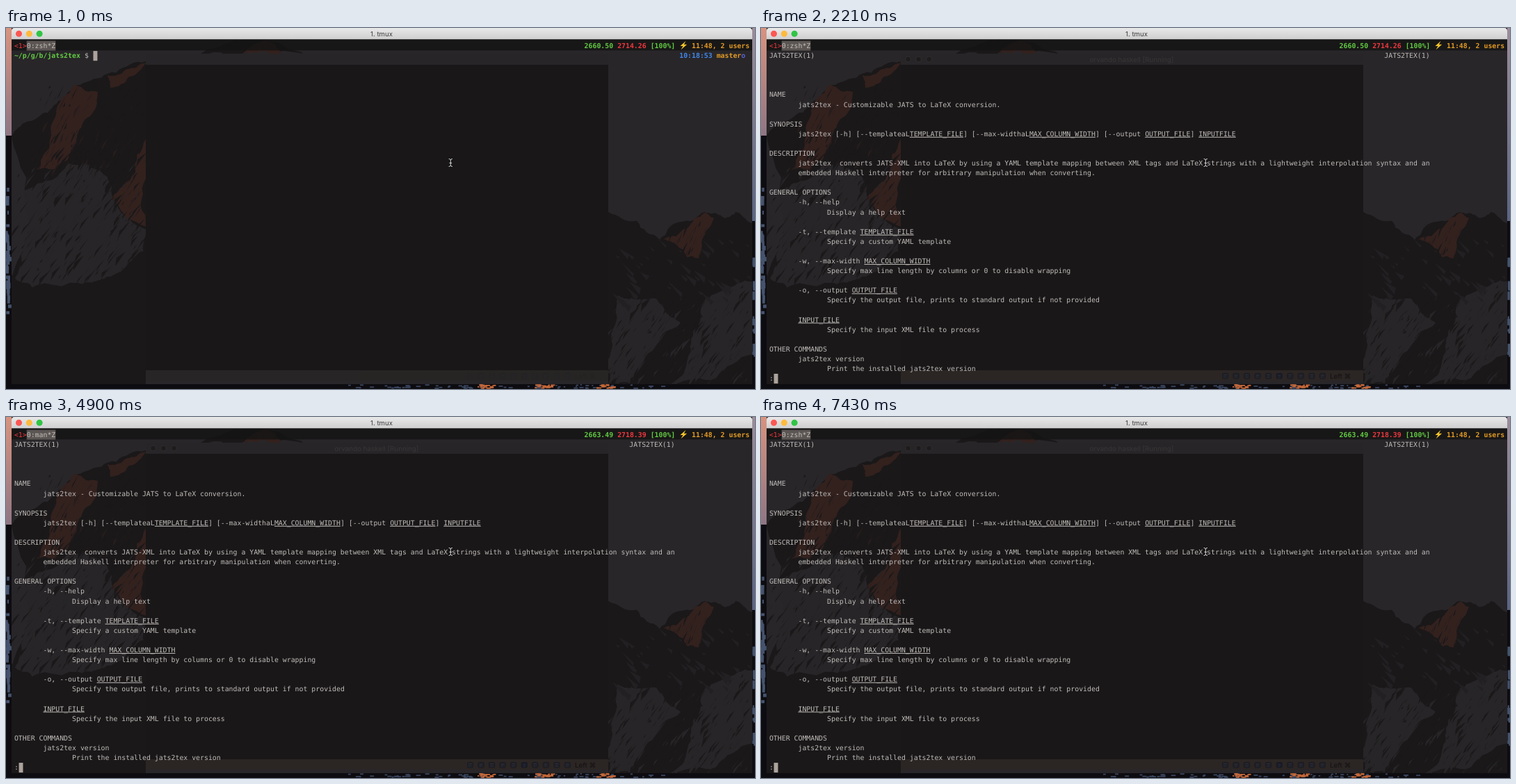
An HTML page for the animation above (8 s loop, 1077x520 px).

```html
<!DOCTYPE html>
<html lang="en">
<head>
<meta charset="utf-8">
<title>jats2tex manual</title>
<style>
  html, body { margin: 0; width: 100%; height: 100%; overflow: hidden; background: #0d0c10; }
  svg { display: block; width: 100%; height: 100%; }
  text { white-space: pre; text-rendering: geometricPrecision; }
  .mono { font: 9.866px "DejaVu Sans Mono", monospace; }
  .bold { font-weight: 700; }
  .ui { font-family: Inter, "Liberation Sans", sans-serif; text-anchor: middle; }
  .u { text-decoration: underline; }
</style>
</head>
<body>
<svg viewBox="0 0 1077 520" preserveAspectRatio="none">
  <defs>
    <linearGradient id="bar" x2="0" y2="1"><stop stop-color="#e9e8e9"/><stop offset="1" stop-color="#d0cfd0"/></linearGradient>
    <linearGradient id="dawn" x2="0" y2="1"><stop stop-color="#d8937f"/><stop offset="1" stop-color="#8f7684"/></linearGradient>
    <linearGradient id="dusk" x2="0" y2="1"><stop stop-color="#9b8d99"/><stop offset="1" stop-color="#5a6482"/></linearGradient>
    <clipPath id="term"><rect x="8" y="16" width="1065" height="497"/></clipPath>
    <path id="beam" d="M-2.3-5.5Q0-5.5 0-4V4Q0 5.5-2.3 5.5M2.3-5.5Q0-5.5 0-4M0 4Q0 5.5 2.3 5.5M-1.5 .5h3" fill="none" stroke-linecap="round"/>
  </defs>
  <g id="wall"></g>
  <g id="land" clip-path="url(#term)"></g>
  <g id="vm"></g>
  <g id="chrome"></g>
  <g id="screen"></g>
  <g transform="translate(639.3 194)">
    <use href="#beam" stroke="#111" stroke-width="2.4"/>
    <use href="#beam" stroke="#d8d8d8"/>
  </g>
</svg>
<script>
const $ = id => document.getElementById(id);
const LOOP = 8000, X0 = 11.9, CW = 5.94, TOP = 19, RH = 14.09;
const SKY = '#282629', SNOW = '#272527', DARK = '#1a1819', RUST = '#33211e', NIGHT = '#0d0c10';
const GREEN = '#62cb43', RED = '#f0383f', ORANGE = '#e19a25', BLUE = '#4187ea', GREY = '#aca39d', TEXT = '#bfbbb8';

let seed = 17;
const rnd = () => (seed = seed * 16807 % 2147483647) / 2147483647;
const between = (a, b) => a + rnd() * (b - a);
const repeat = (n, fn) => Array.from({ length: n }, (_, i) => fn(i)).join('');

const rect = (x, y, w, h, fill, more = '') =>
  `<rect x="${x}" y="${y}" width="${w}" height="${h}" fill="${fill}" ${more}/>`;

// Splits an edge in halves, pushing each middle point sideways.
function crack([ax, ay], [bx, by], depth) {
  if (!depth) return [[bx, by]];
  const push = between(-.13, .13);
  const mid = [(ax + bx) / 2 + (by - ay) * push, (ay + by) / 2 - (bx - ax) * push];
  return [...crack([ax, ay], mid, depth - 1), ...crack(mid, [bx, by], depth - 1)];
}

const jag = points => points.slice(1).flatMap((p, i) => crack(points[i], p, 4));
const shape = (points, fill) =>
  `<polygon points="${points.map(p => p.map(v => v.toFixed(1))).join(' ')}" fill="${fill}"/>`;
const rock = (corners, fill) => shape(jag([...corners, corners[0]]), fill);

// Fills everything below a jagged skyline.
function ridge(points, fill) {
  const right = points[points.length - 1][0], left = points[0][0];
  return shape([points[0], ...jag(points), [right, 520], [left, 520]], fill);
}

// Thin slivers of rock or snow, all leaning the same way.
function slivers(n, x, y, w, h, lean, fill) {
  const d = repeat(n, () => {
    const drop = between(4, 22), wide = between(.8, 4);
    return `M${between(x, x + w).toFixed(1)} ${between(y, y + h).toFixed(1)}` +
      `l${(drop * lean).toFixed(1)} ${drop.toFixed(1)}l${wide.toFixed(1)} ${(-drop * between(.2, .6)).toFixed(1)}z`;
  });
  return `<path d="${d}" fill="${fill}"/>`;
}

function drawWall() {
  const glints = (n, x, w, fill) => repeat(n, () =>
    rect(between(x, x + w), between(513, 518), between(2, 7), 1.8, fill));
  const patches = (n, x, top, bottom) => repeat(n, () =>
    rect(x + between(0, 3), between(top, bottom), between(2, 5), between(4, 16), '#45536d'));
  $('wall').innerHTML =
    rect(0, 0, 1077, 520, NIGHT) +
    rect(0, 0, 8, 155, 'url(#dawn)') + rect(1073, 0, 4, 278, 'url(#dusk)') +
    patches(14, 0, 215, 330) + patches(22, 0, 320, 412) + patches(14, 1073, 320, 470) +
    glints(75, 485, 465, '#3a4660') +
    [690, 773, 862].map(x => glints(20, x - 15, 26, '#c4683a')).join('');
}

function drawLand() {
  const leftPeak = rock([[8, 156], [60, 122], [115, 78], [201, 48], [201, 400], [8, 400]], DARK);
  const faces =
    rock([[100, 82], [132, 92], [104, 150], [72, 203], [44, 204], [70, 130]], RUST) +
    rock([[146, 68], [201, 50], [150, 86]], RUST) +
    rock([[201, 160], [152, 246], [201, 286]], RUST);
  $('land').innerHTML =
    rect(8, 16, 1065, 497, SKY) +
    rock([[280, 37], [372, 14], [427, 37]], DARK) + rock([[342, 36], [372, 18], [398, 36]], RUST) +
    leftPeak +
    rock([[25, 235], [90, 195], [135, 205], [201, 290], [201, 380], [8, 380]], SNOW) + faces +
    slivers(260, 15, 170, 190, 185, -.7, DARK) +
    slivers(120, 50, 80, 150, 120, -.5, DARK) +
    slivers(110, 12, 190, 180, 140, -.7, SNOW) +
    slivers(45, 60, 100, 140, 100, -.5, '#271d1c') +
    ridge([[8, 355], [56, 391], [100, 373], [146, 358], [201, 320]], DARK) +
    ridge([[866, 265], [940, 305], [1005, 265], [1034, 274], [1050, 265], [1073, 281]], DARK) +
    rock([[946, 304], [1005, 266], [1018, 274], [996, 332], [980, 330]], RUST) +
    rock([[880, 385], [935, 390], [970, 425], [900, 513], [866, 513]], SNOW) +
    rock([[1000, 400], [1073, 365], [1073, 470], [960, 513], [985, 450]], SNOW) +
    slivers(30, 950, 270, 60, 60, -.4, DARK) +
    slivers(210, 866, 370, 207, 140, -.7, DARK) +
    slivers(110, 866, 385, 207, 125, -.7, SNOW) +
    slivers(45, 870, 300, 200, 90, .8, '#222022');
}

function drawVm() {
  const icons = repeat(10, i => {
    const x = 663.5 + i * 15.55;
    return rect(x, 497.5, 8, 7.5, i === 5 ? '#171b29' : '#202129', 'rx="1.5" stroke="#1a1b22"') +
      `<path d="M${x + 2} ${499.5 + i % 2}h4M${x + 2} 503h${2 + i % 3}" stroke="#2f2c31"/>`;
  });
  const dots = repeat(3, i =>
    `<circle cx="${211.5 + i * 15}" cy="45" r="4" fill="#1e1c1d" stroke="#312e2f"/>`);
  $('vm').innerHTML =
    rect(201, 37, 665, 471, '#191718') +
    rect(201, 37, 665, 16, '#272527') + rect(201, 493, 665, 15, '#272525') +
    `<g id="vmTitle">${dots}<text class="ui" x="533" y="48.7" font-size="9.8" fill="#393638">orvando haskell [Running]</text></g>` +
    `<g id="vmIcons">${rect(201, 493, 665, 15, '#2b2524')}${icons}` +
    '<text x="818" y="505" font-size="9.8" font-family="Inter, DejaVu Sans, sans-serif" fill="#141213">Left ⌘</text></g>';
}

function drawChrome() {
  $('chrome').innerHTML =
    rect(8, 16, 1065, 16.3, '#141313', 'opacity=".8"') +
    '<path d="M8 16.3V4q0-4 4-4H1069q4 0 4 4V16.3z" fill="url(#bar)"/>' +
    ['#fc5652', '#fdbb3d', '#30c544'].map((c, i) => `<circle cx="${18.5 + i * 14.8}" cy="8.2" r="4.5" fill="${c}"/>`).join('') +
    '<text class="ui" x="540" y="11.8" font-size="9.6" fill="#3b3a3b">1. tmux</text>' +
    '<path d="M977.5 18.8l-8 7.2h4l-3 5.2l8.7-7.4h-4.4z" fill="#f6c52c"/>';
}

// Braces mark underlined words; leading tabs are seven columns each.
const MANUAL = `JATS2TEX(1)${' '.repeat(138)}JATS2TEX(1)



NAME
\tjats2tex - Customizable JATS to LaTeX conversion.

SYNOPSIS
\tjats2tex [-h] [--templateaL{TEMPLATE_FILE}] [--max-widthaL{MAX_COLUMN_WIDTH}] [--output {OUTPUT_FILE}] {INPUTFILE}

DESCRIPTION
\tjats2tex  converts JATS-XML into LaTeX by using a YAML template mapping between XML tags and LaTeX strings with a lightweight interpolation syntax and an
\tembedded Haskell interpreter for arbitrary manipulation when converting.

GENERAL OPTIONS
\t-h, --help
\t\tDisplay a help text

\t-t, --template {TEMPLATE_FILE}
\t\tSpecify a custom YAML template

\t-w, --max-width {MAX_COLUMN_WIDTH}
\t\tSpecify max line length by columns or 0 to disable wrapping

\t-o, --output {OUTPUT_FILE}
\t\tSpecify the output file, prints to standard output if not provided

\t{INPUT_FILE}
\t\tSpecify the input XML file to process

OTHER COMMANDS
\tjats2tex version
\t\tPrint the installed jats2tex version

\tjats2tex upgrade
\t\tLook for a new release of jats2tex and try to automatically upgrade

AUTHORS
\tBruno Calda Moreta, Marevolta Software (https://beijaflor.io).



${' '.repeat(76)}June 2017${' '.repeat(64)}JATS2TEX(1)`.replace(/\t/g, ' '.repeat(7)).split('\n');

const colX = col => X0 + col * CW;
const rowY = row => TOP + row * RH;

function put(row, col, str, fill = TEXT, cls = '', more = '') {
  const body = str.trimStart();
  const x = colX(col + str.length - body.length);
  const marked = body.replace(/</g, '&lt;').replace(/>/g, '&gt;').replace(/{(.*?)}/g, '<tspan class="u">$1</tspan>');
  return `<text class="mono ${cls}" x="${x}" y="${rowY(row) + 10}" fill="${fill}" ${more}>${marked}</text>`;
}

const block = (row, col) => rect(colX(col) + .7, rowY(row), CW, RH, GREY);

const status = (job, green, red) =>
  put(0, 0, '<1>', RED) +
  rect(colX(3), rowY(0) - .5, CW * 7, RH, '#5b5653') + put(0, 3, `0:${job}*Z`, '#c5bfb9') +
  put(0, 138, green, GREEN, 'bold') + put(0, 146, red, RED, 'bold') +
  put(0, 154, '[100%]', GREEN, 'bold') + put(0, 164, '11:48, 2 users', ORANGE, 'bold');

const prompt = (row, clock, typed) =>
  put(row, 0, '~/p/g/b/jats2tex', GREEN, 'bold') + put(row, 17, '$ ' + typed) +
  put(row, 161, clock, BLUE, 'bold') + put(row, 170, 'master', ORANGE, 'bold') +
  put(row, 176, 'o', '#5a62d6', 'bold');

function page(first, cursor) {
  const lines = MANUAL.slice(first, first + 33).map((line, i) => line && put(i + 1, 0, line));
  const foot = first ? '(END)' : ':';
  return lines.join('') + put(34, 0, foot, TEXT, '', first ? 'font-style="italic"' : '') +
    (cursor ? block(34, foot.length) : '');
}

const FIRST = '10:18:53', SECOND = '10:19:01';
const KEYS = ['m', 'an', ' ', 'j', 'a', 'ts', '', '2', 't', 'e', 'x'];
const COMMAND = KEYS.join(''), TYPE_AT = 585, KEY_MS = 148;

function content(t) {
  if (t < 2210) {
    const strokes = Math.max(0, Math.floor((t - TYPE_AT) / KEY_MS) + 1);
    const typed = KEYS.slice(0, strokes).join('');
    return prompt(1, FIRST, typed) + (t < 150 || strokes ? block(1, 19 + typed.length) : '');
  }
  if (t < 4150) return page(0, t < 3260 || t >= 3850);
  if (t < 4900) return page(10, t < 4600);
  if (t < 5950 || t >= 7430) return page(0, true);
  const before = prompt(1, FIRST, COMMAND);
  if (t < 6090) return before + block(2, 0);
  if (t < 7140) return before + prompt(2, SECOND, '') + block(2, 19);
  return before + prompt(2, SECOND, COMMAND) + (t < 7290 ? block(2, 31) : block(3, 0));
}

let shown = '';
function draw(t) {
  const job = t >= 4150 && t < 7140 ? 'man' : 'zsh';
  const html = status(job, t < 4600 ? '2660.50' : '2663.49', t < 4450 ? '2714.26' : '2718.39') + content(t);
  if (html !== shown) $('screen').innerHTML = shown = html;
  $('vmTitle').setAttribute('opacity', t < 2070 ? 0 : t >= 4150 && t < 4900 ? .45 : 1);
  $('vmIcons').setAttribute('opacity', t < 2210 ? .2 : 1);
}

drawWall();
drawLand();
drawVm();
drawChrome();
const start = performance.now();
function tick() {
  draw((performance.now() - start) % LOOP);
  requestAnimationFrame(tick);
}
tick();
</script>
</body>
</html>
```
